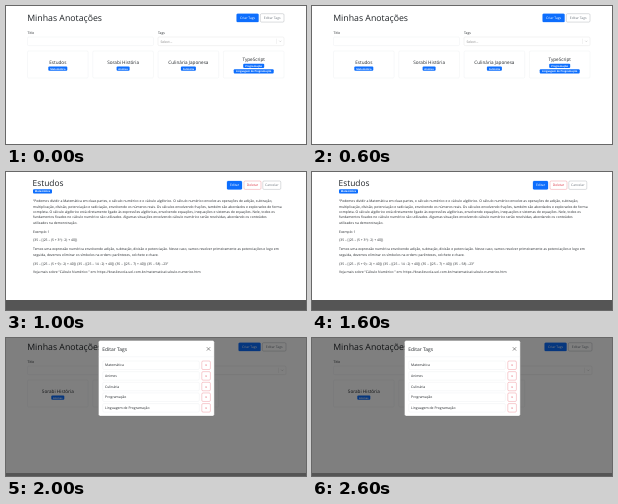
Write an HTML page that moves like this. It is 300 px wide and 138 px high and loops after 3000 ms.

```html
<!DOCTYPE html>
<html lang="pt-BR">
<head>
<meta charset="utf-8">
<title>Minhas Anotações</title>
<style>
html, body { margin: 0; width: 100%; height: 100%; overflow: hidden; background: #fff; }
svg { display: block; width: 100vw; height: 100vh; font-family: "Open Sans", "Noto Sans", sans-serif; text-rendering: geometricPrecision; }
.scene { visibility: hidden; animation: show 3s step-end infinite; }
#note { animation-delay: -2s; }
#modal { animation-delay: -1s; }
@keyframes show {
  0% { visibility: visible; }
  33.3333%, 100% { visibility: hidden; }
}
</style>
</head>
<body>
<svg viewBox="0 0 300 138">
  <g id="list" class="scene"></g>
  <g id="note" class="scene"></g>
  <g id="modal" class="scene"></g>
</svg>
<script>
const BLUE = '#0d6efd', RED = '#dc3545', GRAY = '#6c757d', INK = '#212529', LINE = '#dee2e6';

const text = (x, y, size, str, fill = INK, extra = '') =>
  `<text x="${x}" y="${y}" font-size="${size}" fill="${fill}" ${extra}>${str}</text>`;
const mid = (x, y, size, str, fill, extra = '') =>
  text(x, y, size, str, fill, `text-anchor="middle" ${extra}`);
const box = (x, y, w, h, fill = '#fff', stroke = LINE, r = 1.2) =>
  `<rect x="${x}" y="${y}" width="${w}" height="${h}" rx="${r}" fill="${fill}" stroke="${stroke}" stroke-width=".25"/>`;
const line = (x1, y1, x2, y2, stroke = LINE, width = .25) =>
  `<path d="M${x1} ${y1}L${x2} ${y2}" stroke="${stroke}" stroke-width="${width}"/>`;

function button(x, y, w, label, color, solid) {
  return box(x, y, w, 8.4, solid ? color : '#fff', color) +
    mid(x + w / 2, y + 5.4, 3.3, label, solid ? '#fff' : color);
}

function badge(cx, y, w, label) {
  return box(cx - w / 2, y, w, 4.4, BLUE, 'none', 1) +
    mid(cx, y + 3.1, 2.55, label, '#fff', 'font-weight="700"');
}

function card(i, top, [title, ...tags]) {
  const x = 21.5 + i * 65.3, cx = x + 30.3;
  const first = top + (tags.length > 1 ? 12.7 : 15.4);
  return box(x, top, 60.6, 27) +
    mid(cx, first - 2.9, 4.65, title) +
    tags.map(([label, w], k) => badge(cx, first + k * 5.5, w, label)).join('');
}

const cards = [
  ['Estudos', ['Matemática', 19]],
  ['Sorabi História', ['Animes', 13]],
  ['Culinária Japonesa', ['Culinária', 15]],
  ['TypeScript', ['Programação', 21], ['Linguagem de Programação', 40]]
];

// Main page; dy and dx shift it behind the dialog.
function page(items, dy = 0, dx = 0) {
  const y = 31 + dy;
  return text(21.2, 14.6 + dy, 8.75, 'Minhas Anotações') +
    button(230.6 + dx, 7.7 + dy, 22, 'Criar Tags', BLUE, true) +
    button(254.4 + dx, 7.7 + dy, 23.6, 'Editar Tags', GRAY) +
    text(21.5, 27.8 + dy, 3.4, 'Title') +
    text(152, 27.8 + dy, 3.4, 'Tags') +
    box(21.5, y, 126, 8.6) +
    box(152, y, 126 + dx, 8.6, '#fff', '#ccc') +
    text(154.4, y + 5.6, 3.4, 'Select...', '#808080') +
    line(270.5 + dx, y + 1.7, 270.5 + dx, y + 6.9, '#ccc') +
    `<path d="M${273.2 + dx} ${y + 3.7}l1.1 1.1 1.1-1.1" fill="none" stroke="#bbb" stroke-width=".5"/>` +
    items.map((c, i) => card(i, 45 + dy, c)).join('');
}

const paragraphs = [
  ['“Podemos dividir a Matemática em duas partes, o cálculo numérico e o cálculo algébrico. O cálculo numérico envolve as operações de adição, subtração,',
   'multiplicação, divisão, potenciação e radiciação, envolvendo os números reais. Os cálculos envolvendo frações, também são abordados e explorados de forma',
   'completa. O cálculo algébrico está diretamente ligado às expressões algébricas, envolvendo equações, inequações e sistemas de equações. Nele, todos os',
   'fundamentos fixados no cálculo numérico são utilizados. Algumas situações envolvendo cálculo numérico serão resolvidas, abordando os conteúdos',
   'utilizados na demonstração.'],
  ['Exemplo 1'],
  ['{35 – [(25 – (5 + 3²) : 2) + 40]}'],
  ['Temos uma expressão numérica envolvendo adição, subtração, divisão e potenciação. Nesse caso, vamos resolver primeiramente as potenciações e logo em',
   'seguida, devemos eliminar os símbolos na ordem: parênteses, colchete e chave.'],
  ['{35 – [(25 – (5 + 9) : 2) + 40]} {35 – [(25 – 14 : 2) + 40]} {35 – [(25 – 7) + 40]} {35 – 58} –23”'],
  ['Veja mais sobre “Cálculo Numérico ” em: https://brasilescola.uol.com.br/matematica/calculo-numerico.htm']
];

function note() {
  let y = 30.2, out = '';
  for (const p of paragraphs) {
    for (const row of p) {
      out += text(27, y, 3.38, row);
      y += 5.37;
    }
    y += 3.5;
  }
  return text(26.6, 14, 8.4, 'Estudos') + badge(36.5, 17.2, 19, 'Matemática') +
    button(221, 9, 15, 'Editar', BLUE, true) +
    button(238, 9, 17, 'Deletar', RED) +
    button(256.8, 9, 18, 'Cancelar', GRAY) + out +
    '<path d="M0 128H300V138H0z" fill="#555"/>';
}

function modal() {
  const tags = ['Matemática', 'Animes', 'Culinária', 'Programação', 'Linguagem de Programação'];
  const rows = tags.map((tag, i) => {
    const y = 23 + i * 10.65;
    return box(96.8, y, 96.5, 8.5) + text(99.1, y + 5.4, 3.42, tag) +
      box(195.8, y, 8.6, 8.5, '#fff', RED) + mid(200.1, y + 5.3, 3.2, 'x', RED);
  });
  return page(cards.slice(1), -3, 2) +
    '<path d="M0 0H300V138H0z" opacity=".5"/>' +
    '<path d="M0 135H300V138H0z" fill="#555"/>' +
    box(92.5, 2.5, 115.8, 75.5, '#fff', '#666', 1.7) +
    text(96.2, 12.7, 4.95, 'Editar Tags') +
    line(200.8, 9.2, 204.2, 12.6, '#666', .7) + line(204.2, 9.2, 200.8, 12.6, '#666', .7) +
    line(92.6, 18.8, 208.2, 18.8) + rows.join('');
}

const fill = (id, html) => { document.getElementById(id).innerHTML = html; };
fill('list', page(cards));
fill('note', note());
fill('modal', modal());
</script>
</body>
</html>
```
